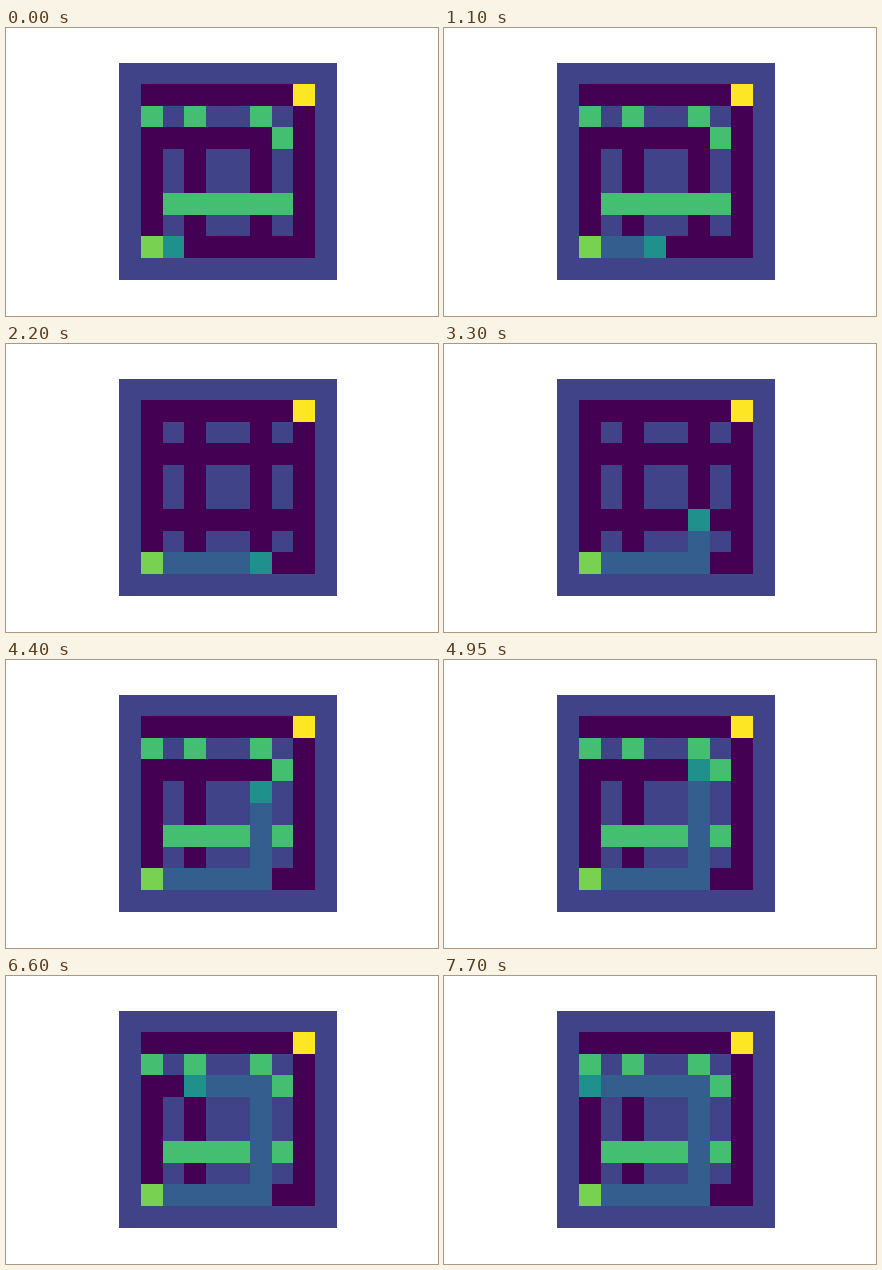
An HTML page for the animation above (8000 ms loop, 432 by 288 pixels).

```html
<!DOCTYPE html>
<html lang="en">
<head>
<meta charset="utf-8">
<title>Maze walk</title>
<style>
  html, body { margin: 0; width: 100%; height: 100%; overflow: hidden; background: #fff; }
  svg { display: block; width: 432px; height: 288px; }
</style>
</head>
<body>
<svg id="stage" viewBox="0 0 432 288" shape-rendering="crispEdges"></svg>
<script>
const LOOP = 8000, STEP = 550, SIZE = 10, CELL = 21.8;
const COLORS = {
  floor: '#440154', wall: '#404387', trail: '#345e8d', agent: '#20908c',
  door: '#44be70', start: '#79d151', goal: '#fde724'
};

// # wall, D door, S start, G goal
const MAZE = [
  '##########',
  '#.......G#',
  '#D#D##D#.#',
  '#......D.#',
  '#.#.##.#.#',
  '#.#.##.#.#',
  '#.DDDDDD.#',
  '#.#.##.#.#',
  '#S.......#',
  '##########'
];
const KINDS = { '#': 'wall', D: 'door', S: 'start', G: 'goal', '.': 'floor' };

// Corners of the walk as [column, row]
const CORNERS = [[2, 8], [6, 8], [6, 3], [1, 3]];
const DOORS_OPEN = 3, DOORS_SHUT = 8;

const path = [CORNERS[0]];
for (const [x, y] of CORNERS.slice(1)) {
  let [px, py] = path[path.length - 1];
  while (px !== x || py !== y) {
    px += Math.sign(x - px);
    py += Math.sign(y - py);
    path.push([px, py]);
  }
}

const edgeX = i => Math.round(113 + i * CELL);
const edgeY = i => Math.max(35, Math.round(34 + i * CELL));

const stage = document.getElementById('stage');
const cells = MAZE.map((row, y) => [...row].map((_, x) => {
  const rect = document.createElementNS('http://www.w3.org/2000/svg', 'rect');
  rect.setAttribute('x', edgeX(x));
  rect.setAttribute('y', edgeY(y));
  rect.setAttribute('width', edgeX(x + 1) - edgeX(x));
  rect.setAttribute('height', edgeY(y + 1) - edgeY(y));
  return stage.appendChild(rect);
}));

function draw(step) {
  const open = step >= DOORS_OPEN && step < DOORS_SHUT;
  const paint = (x, y, kind) => cells[y][x].setAttribute('fill', COLORS[kind]);
  for (let y = 0; y < SIZE; y++) {
    for (let x = 0; x < SIZE; x++) {
      const kind = KINDS[MAZE[y][x]];
      paint(x, y, kind === 'door' && open ? 'floor' : kind);
    }
  }
  path.slice(0, step).forEach(([x, y]) => paint(x, y, 'trail'));
  paint(...path[step], 'agent');
}

const begin = performance.now();
let shown = 0;
function tick() {
  const step = Math.floor(((performance.now() - begin) % LOOP) / STEP);
  if (step !== shown) draw(shown = step);
  requestAnimationFrame(tick);
}
draw(0);
requestAnimationFrame(tick);
</script>
</body>
</html>
```
